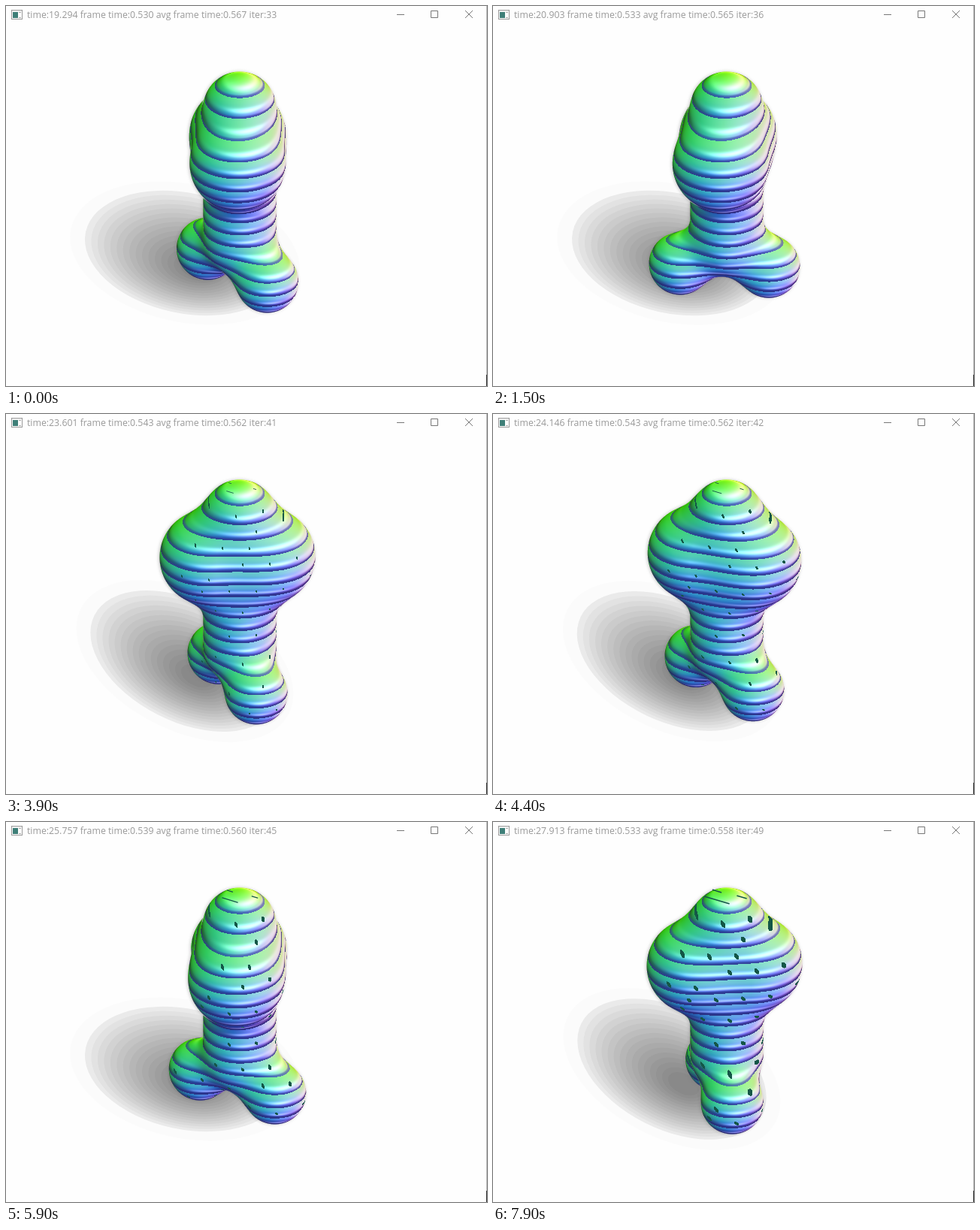
Recreate the animation shown at these times as an HTML page with a canvas. Size 640 by 506 pixels, loop 8 s.

```html
<!DOCTYPE html>
<html lang="en">
<head>
<meta charset="utf-8">
<title>Ribbed sculpture</title>
<style>
html, body { margin: 0; width: 100%; height: 100%; overflow: hidden; background: #fefefe; }
canvas, svg { position: absolute; left: 0; top: 0; }
#title { position: absolute; left: 28px; top: 3px; font: 12.3px/17px "Open Sans", "Noto Sans", sans-serif; color: #999; white-space: pre; }
</style>
</head>
<body>
<canvas id="stage" width="640" height="506"></canvas>
<svg width="640" height="506" fill="none" stroke="#777">
  <rect x="7.5" y="5.5" width="14" height="12" stroke="#999" fill="#fff"/>
  <path d="M8 6h13" stroke="#bbb"/>
  <rect x="9" y="8" width="7" height="8" fill="#3f7f78" stroke="none"/>
  <path d="M17 8.5h3M17 15.5h3" stroke="#aaa"/>
  <path d="M520 11.5h10M565.5 6.5h9v9h-9zM611 6l10 10M621 6l-10 10"/>
  <path d="M639.5 0V506" stroke="#b4b4b4"/>
  <path d="M639.5 491v15" stroke="#222"/>
</svg>
<div id="title"></div>
<script>
// Iteration, clock, frame time, average, then the turn of the upper and lower bar in degrees.
const keys = [
  [33, 19.294, .530, .567, 90, 48],
  [36, 20.903, .533, .565, 98, 4],
  [39, 22.512, .543, .563, 142, -85],
  [42, 24.146, .543, .562, 195, -130],
  [44, 25.216, .539, .560, 270, -133],
  [47, 26.840, .538, .559, 278, -176],
  [49, 27.913, .533, .558, 355, -280],
];

const ctx = stage.getContext('2d');
const X0 = 185, Y0 = 80, W = 255, H = 360;
const layer = new OffscreenCanvas(W, H), layerCtx = layer.getContext('2d');
const COS = .866, SIN = .5; // the camera looks down by 30 degrees
const clamp = (v, a = 0, b = 1) => Math.min(b, Math.max(a, v));
const mix = (a, b, t) => a + (b - a) * t;
const smooth = (a, b, v) => { const t = clamp((v - a) / (b - a)); return t * t * (3 - 2 * t); };

function stateAt(iter) {
  const i = Math.max(1, keys.findIndex(k => k[0] >= iter));
  const a = keys[i - 1], b = keys[i], t = (iter - a[0]) / (b[0] - a[0]);
  return a.map((v, j) => mix(v, b[j], t));
}

function softMin(a, b, k) {
  const h = Math.max(k - Math.abs(a - b), 0) / k;
  return Math.min(a, b) - h * h * k / 4;
}

// A bar is two balls on opposite sides of the axis; heights are given on screen.
function bar(x, height, reach, radius, degrees) {
  const a = degrees * Math.PI / 180;
  return [1, -1].map(side =>
    [x + side * reach * Math.cos(a), height / COS, side * reach * Math.sin(a), radius]);
}

// Distance to a spine with two bars; x right, y down, z towards the viewer.
function sculpture(upper, lower) {
  const balls = [...bar(308, 190, 40, 63, upper), ...bar(308, 345, 59, 41, lower)];
  const top = 136 / COS, bottom = 310 / COS;
  return (x, y, z) => {
    let d = Math.sqrt((x - 311) ** 2 + (y - clamp(y, top, bottom)) ** 2 + z * z) - 48;
    for (const [bx, by, bz, r] of balls)
      d = softMin(d, Math.sqrt((x - bx) ** 2 + (y - by) ** 2 + (z - bz) ** 2) - r, 32);
    return d;
  };
}

// Nearest approach of the ray through a pixel.
function march(dist, x, y) {
  const far = y * SIN / COS + 135;
  let t = far - 270, best = 1e9, tBest = t;
  for (let i = 0; i < 48 && t < far; i++) {
    const d = dist(x, COS * y + SIN * t, SIN * y - COS * t);
    if (d < best) { best = d; tBest = t; }
    if (d < .15) break;
    t += d;
  }
  return [best, COS * y + SIN * tBest, SIN * y - COS * tBest];
}

function shade(dist, x, y, z, grow) {
  const e = .7, d0 = dist(x, y, z);
  let nx = dist(x + e, y, z) - d0, up = d0 - dist(x, y + e, z), front = dist(x, y, z + e) - d0;
  const len = Math.hypot(nx, up, front);

  // Every ring is a rounded step: its top looks up, its lip looks down.
  const v = y * COS - 106, n = v / 19 + v * v * 2.5e-5;
  const ring = Math.floor(n), f = n - ring;
  const slope = Math.sqrt(Math.max(.1, 1 - (up / len) ** 2));
  nx /= len; front /= len;
  up = up / len + .75 * slope * (1 - 2.1 * f * f);
  const l2 = Math.hypot(nx, up, front);
  nx /= l2; up /= l2; front /= l2;

  const lit = Math.max(0, .4 * nx + .8 * up + .3 * front), gain = .68 + .48 * lit;
  const shine = .38 * Math.exp(-(((f - .62) / .13) ** 2) - ((nx - .15) / .45) ** 2);
  const rim = .65 * smooth(.5, .95, nx) * smooth(-.5, .2, up);
  const groove = .6 * smooth(.84, .94, f);
  const rgb = [
    Math.max(.2, .28 + .45 * nx + .16 * up),
    .5 + .39 * up,
    .2 + .75 * front + .35 * Math.max(0, nx),
  ];

  // Small slits open on the rings as time goes on.
  const sx = x + 9 * ring, cell = Math.floor(sx / 36), dx = sx - cell * 36 - 18;
  const slit = grow > 0 && ring >= 0 && Math.sin(ring * 91 + cell * 37) > -.3 &&
    Math.hypot(dx / (.7 + 2.8 * grow), (f - .5 - dx * .03) / (.06 + .1 * grow)) < 1;

  return rgb.map((c, i) => {
    c = mix(clamp(c * gain + shine), 1, rim);
    c = mix(c, [.2, .27, .58][i], groove);
    return 255 * (slit ? [.08, .34, .28][i] : c);
  });
}

function drawBody(dist, grow) {
  const image = layerCtx.createImageData(W, H);
  for (let j = 0; j < H; j++) for (let i = 0; i < W; i++) {
    const x = i + X0 + .5, [near, y, z] = march(dist, x, j + Y0 + .5);
    if (near > 1) continue;
    image.data.set([...shade(dist, x, y, z, grow), 255 * clamp(1.15 - near)], (j * W + i) * 4);
  }
  layerCtx.putImageData(image, 0, 0);
  ctx.save();
  ctx.shadowColor = 'rgba(110,110,110,.4)';
  ctx.shadowBlur = 4;
  ctx.shadowOffsetX = -1;
  ctx.drawImage(layer, X0, Y0);
  ctx.restore();
}

function drawShadow(turn) {
  const ring = (t, size, alpha) => {
    ctx.fillStyle = `rgba(20,20,24,${alpha})`;
    ctx.beginPath();
    ctx.ellipse(mix(238, 255, t), mix(329, 350, t), 135 * size, 80 * size, turn, 0, 7);
    ctx.fill();
  };
  ring(0, 1.15, .01);
  for (let i = 0; i < 16; i++) ring(i / 16, 1 - i / 18, i ? .034 : .07);
}

function drawTopSlits(grow) {
  ctx.strokeStyle = '#14564a';
  ctx.lineCap = 'round';
  ctx.lineWidth = .6 + grow;
  for (const [x, y, size] of [[298, 92, 11], [298, 104, 32], [331, 100, 12]]) {
    const d = size * grow / 2;
    ctx.beginPath();
    ctx.moveTo(x - d, y - d * .3);
    ctx.lineTo(x + d, y + d * .3);
    ctx.stroke();
  }
}

function draw(iter) {
  const [, clock, last, mean, upper, lower] = stateAt(iter);
  const grow = Math.max(0, (iter - 38) / 11);
  title.textContent = `time:${clock.toFixed(3)} frame time:${last.toFixed(3)} avg frame time:${mean.toFixed(3)} iter:${iter}`;
  ctx.clearRect(0, 0, 640, 506);
  drawShadow(.34 + .13 * Math.cos(upper * Math.PI / 90));
  drawBody(sculpture(upper, lower), grow);
  if (grow) drawTopSlits(grow);
}

let shown;
function tick() {
  const t = performance.now() % 8000;
  const iter = 33 + Math.floor((t + (t < 2000 ? 0 : 100)) / 500);
  if (iter !== shown) draw(shown = iter);
  requestAnimationFrame(tick);
}
tick();
</script>
</body>
</html>
```
